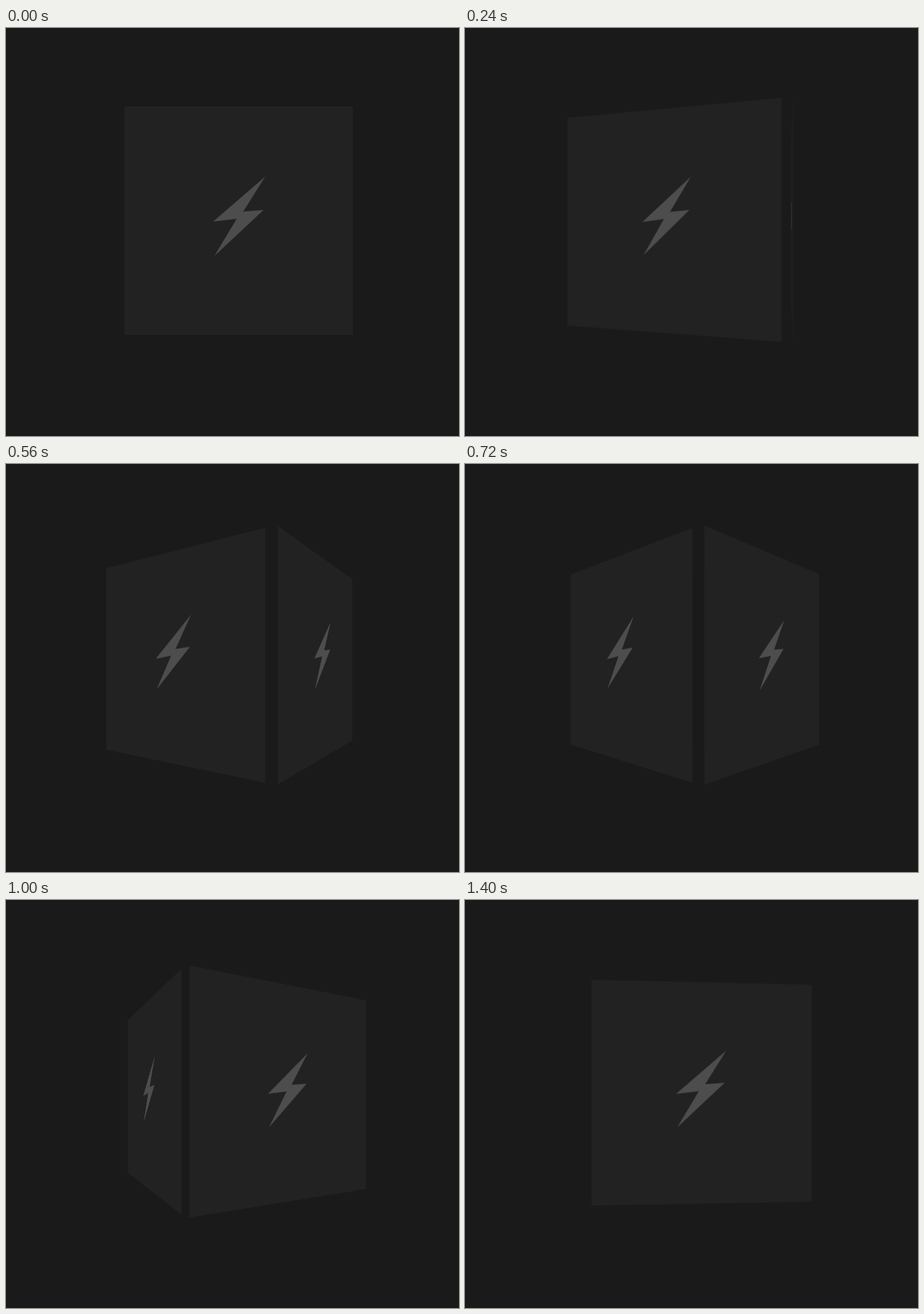
Recreate the animation shown at these times as an HTML page. Size 700x630 px, loop 1.44 s.

```html
<!DOCTYPE html>
<html lang="en">
<head>
<meta charset="utf-8">
<title>Turning cube</title>
<style>
  html, body { margin: 0; width: 100%; height: 100%; overflow: hidden; background: #1a1a1a; }

  .stage {
    position: relative;
    width: 700px;
    height: 630px;
    overflow: hidden;
    perspective: 550px;
    perspective-origin: 350px 315px;
  }

  /* Zero-width box on the vertical axis of rotation */
  .cube {
    position: absolute;
    left: 373.5px;
    top: 120.5px;
    width: 0;
    height: 353px;
    transform-style: preserve-3d;
    animation: turn 1440ms steps(36) infinite;
  }

  .face {
    position: absolute;
    left: 0;
    top: 0;
    width: 353px;
    height: 353px;
    background: #222;
    transform-origin: 0 0;
  }

  .front {
    transform: translate3d(-191px, 0, 198px);
    backface-visibility: hidden;
  }

  .side {
    --shift: -5px;
    transform: rotateY(90deg) translate3d(-192.5px, 0, 179px);
    animation: appear 1440ms step-end infinite;
  }

  .face::before {
    content: "";
    position: absolute;
    inset: 0;
    background: #4d4d4d;
    transform: translateX(var(--shift, 0));
    clip-path: polygon(217.5px 108.5px, 137px 178px, 173.5px 173.5px,
                       139px 231px, 215px 160px, 183.5px 162.5px);
  }

  @keyframes turn {
    from { transform: translateZ(-198px) rotateY(0deg); }
    to { transform: translateZ(-198px) rotateY(-88.7deg); }
  }

  /* The side is hidden until it is seen edge-on */
  @keyframes appear {
    0% { opacity: 0; }
    16.6% { opacity: .5; }
    19.4%, 100% { opacity: 1; }
  }
</style>
</head>
<body>
<div class="stage">
  <div class="cube">
    <div class="face front"></div>
    <div class="face side"></div>
  </div>
</div>
</body>
</html>
```
